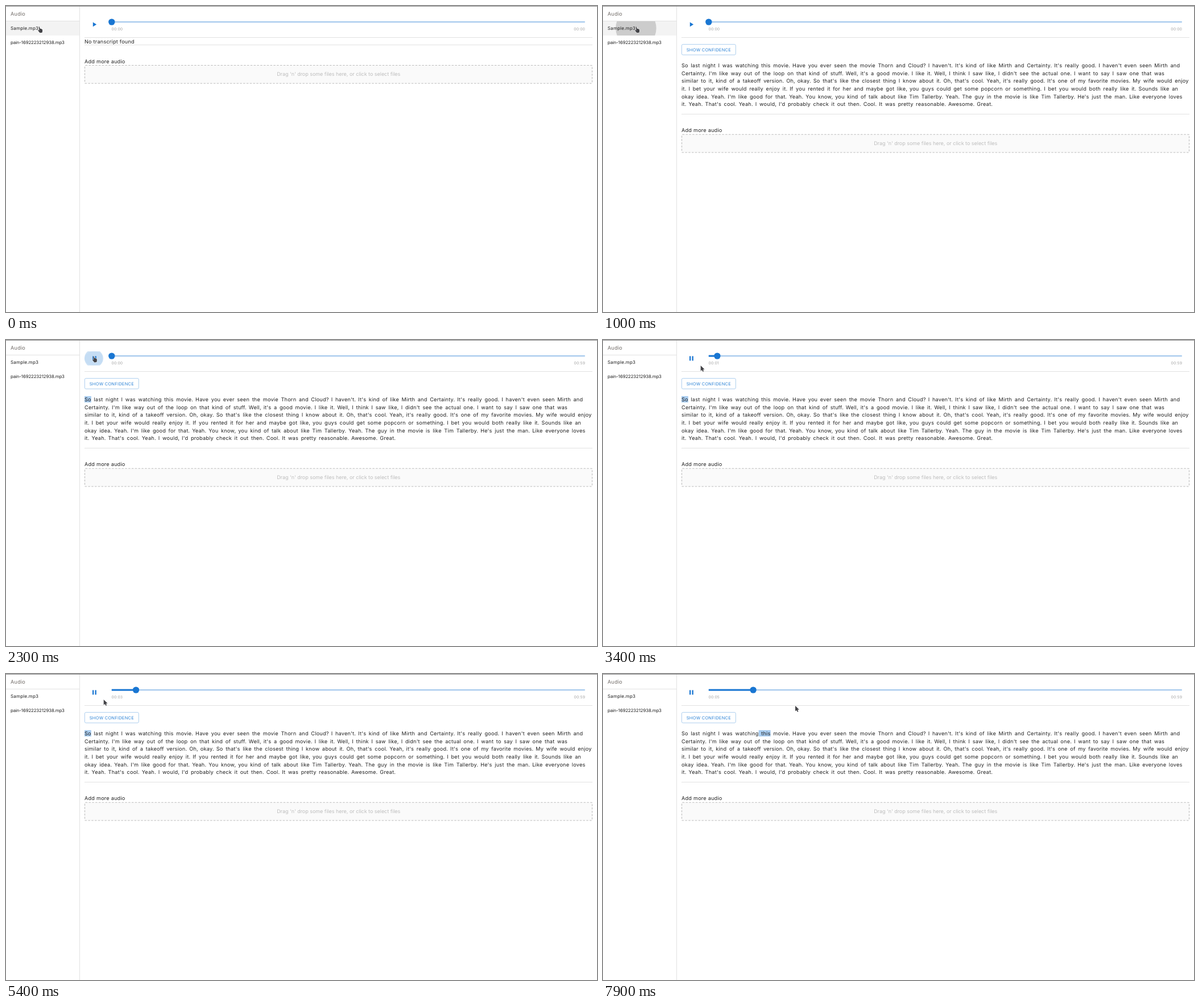
Recreate the animation shown at these times as an HTML page with a canvas. Size 1039 px wide and 539 px high, loop 8000 ms.

```html
<!DOCTYPE html>
<html lang="en">
<head>
<meta charset="utf-8">
<title>Audio transcript player</title>
<style>
  html, body { margin: 0; width: 100%; height: 100%; overflow: hidden; background: #fff; }
  canvas { display: block; width: 1039px; height: 539px; }
</style>
</head>
<body>
<canvas id="stage"></canvas>
<script>
const W = 1039, H = 539, LOOP = 8000, TICK = 100;
const canvas = document.getElementById('stage');
const ctx = canvas.getContext('2d');
const ratio = window.devicePixelRatio || 1;
canvas.width = W * ratio;
canvas.height = H * ratio;

const BLUE = '#1976d2', INK = '#212121', LINE = '#e2e2e2', MUTED = '#bdbdbd';
const BODY = 9.14, WORD_GAP = 4.6;
const MAIN_X = 138, MAIN_W = 893;
const RAIL_X = 185.8, RAIL_W = 832, RAIL_Y = 28.1;

const PRESS_ROW = 810, LOADED = 1000, DURATION_KNOWN = 1200, LEAVE_ROW = 1500;
const PRESS_PLAY = 2110, PLAYING = 2200, AUDIO_START = 2330;
const FIRST_UPDATE = 2840, UPDATE_EVERY = 280, SPEED = 0.0141;
const SPEECH_START = 6700;

const transcript = [
  "So last night I was watching this movie. Have you ever seen the movie Thorn and Cloud? I haven't. It's kind of like Mirth and Certainty. It's really good. I haven't even seen Mirth and",
  "Certainty. I'm like way out of the loop on that kind of stuff. Well, it's a good movie. I like it. Well, I think I saw like, I didn't see the actual one. I want to say I saw one that was",
  "similar to it, kind of a takeoff version. Oh, okay. So that's like the closest thing I know about it. Oh, that's cool. Yeah, it's really good. It's one of my favorite movies. My wife would enjoy",
  "it. I bet your wife would really enjoy it. If you rented it for her and maybe got like, you guys could get some popcorn or something. I bet you would both really like it. Sounds like an",
  "okay idea. Yeah. I'm like good for that. Yeah. You know, you kind of talk about like Tim Tallerby. Yeah. The guy in the movie is like Tim Tallerby. He's just the man. Like everyone loves",
  "it. Yeah. That's cool. Yeah. I would, I'd probably check it out then. Cool. It was pretty reasonable. Awesome. Great."
];

const pointerHome = { x: 57.5, y: 36.3 };
const pointerMoves = [
  { from: 1200, to: 1700, x: 153.3, y: 28.5 },
  { from: 3000, to: 3200, x: 171.7, y: 45 },
  { from: 7300, to: 7900, x: 338, y: 56 }
];
const ARROW_FROM = 3200;

const clamp = v => Math.max(0, Math.min(1, v));
const progress = (t, from, to) => clamp((t - from) / (to - from));

// Standard ripple easing, cubic-bezier(.4, 0, .2, 1)
function ease(p) {
  let lo = 0, hi = 1;
  for (let i = 0; i < 20; i++) {
    const u = (lo + hi) / 2, v = 1 - u;
    if (1.2 * u * v * v + 0.6 * u * u * v + u * u * u < p) lo = u; else hi = u;
  }
  return 3 * lo * lo - 2 * lo * lo * lo;
}

function rect(x, y, w, h, color) {
  ctx.fillStyle = color;
  ctx.fillRect(x, y, w, h);
}

function disc(x, y, r, color) {
  ctx.fillStyle = color;
  ctx.beginPath();
  ctx.arc(x, y, r, 0, Math.PI * 2);
  ctx.fill();
}

function polygon(points, x, y) {
  ctx.beginPath();
  points.forEach(([px, py]) => ctx.lineTo(x + px, y + py));
  ctx.closePath();
}

function setFont(size, tracking) {
  ctx.font = `${size}px Inter, "Open Sans", sans-serif`;
  ctx.textRendering = 'geometricPrecision';
  ctx.letterSpacing = tracking + 'px';
}

function label(text, x, y, size, color, { tracking = size * 0.024, align = 'left' } = {}) {
  setFont(size, tracking);
  ctx.textAlign = align;
  ctx.fillStyle = color;
  ctx.fillText(text, x, y);
}

// Words with their left and right edges; punctuation sits a little tighter
function layout(line) {
  setFont(BODY, BODY * 0.026);
  let x = MAIN_X;
  return line.split(' ').map(text => {
    const left = x, right = left + ctx.measureText(text).width;
    x = right + WORD_GAP - (/\W$/.test(text) ? 0.7 : 0);
    return { text, left, right };
  });
}

function ripple(box, x, y, r, color, alpha) {
  ctx.save();
  ctx.beginPath();
  ctx.rect(...box);
  ctx.clip();
  ctx.globalAlpha = alpha;
  disc(x, y, r, color);
  ctx.restore();
}

function drawSidebar(t) {
  if (t < LEAVE_ROW) rect(0, 27, 129, 25, '#f3f3f3');
  const grow = ease(progress(t, PRESS_ROW, PRESS_ROW + 550));
  const fade = 1 - progress(t, LOADED, LOADED + 550);
  ripple([0, 27, 129, 25], 58, 39, 73 * grow, '#000', 0.16 * fade);
  rect(129, 1, 1, H, LINE);
  rect(0, 26, 129, 1, LINE);
  label('Audio', 8, 16.9, BODY, '#706b67');
  label('Sample.mp3', 8, 42.3, 8, INK);
  label('pain-1692223212938.mp3', 8, 66.5, 7.85, INK, { tracking: -0.12 });
}

function drawPlayButton(t) {
  if (t >= 1700 && t < 2800) {
    ctx.fillStyle = 'rgba(25,118,210,.04)';
    ctx.beginPath();
    ctx.ellipse(155, 32.4, 17, 12.4, 0, 0, Math.PI * 2);
    ctx.fill();
  }
  const grow = ease(progress(t, PRESS_PLAY, PRESS_PLAY + 400));
  const fade = 1 - progress(t, 2300, 2600);
  ripple([138, 20, 34, 24.8], 154.3, 32.4, 22 * grow, BLUE, 0.22 * fade);
  if (t < PLAYING) {
    ctx.fillStyle = BLUE;
    polygon([[0, 0], [6.3, 4], [0, 8]], 152.8, 28.4);
    ctx.fill();
  } else {
    rect(152, 28.4, 2.3, 8, BLUE);
    rect(156.5, 28.4, 2.3, 8, BLUE);
  }
}

// Milliseconds of audio at the player's last position report
function playedAt(t) {
  const n = Math.floor((t - FIRST_UPDATE) / UPDATE_EVERY);
  return n < 0 ? 0 : FIRST_UPDATE + n * UPDATE_EVERY - AUDIO_START;
}

function drawSlider(t) {
  const played = playedAt(t), length = played * SPEED;
  rect(RAIL_X, RAIL_Y - 1.15, RAIL_W, 2.3, '#a7caed');
  if (length) rect(RAIL_X, RAIL_Y - 1.5, length, 3, BLUE);
  disc(RAIL_X + length, RAIL_Y, 5.7, BLUE);
  const clock = s => '00:' + String(s).padStart(2, '0');
  label(clock(Math.floor(played / 1000)), 185.5, 42.6, 6.86, '#a9a9a9', { tracking: 0.1 });
  label(clock(t < DURATION_KNOWN ? 0 : 59), 1018, 42.6, 6.86, '#a9a9a9', { tracking: 0.1, align: 'right' });
  rect(MAIN_X, 55, MAIN_W, 1, LINE);
}

// The first word waits out the opening pause, then speech gathers pace
function spokenIndex(t) {
  return Math.floor(t < SPEECH_START ? 0 : 1 + 5 * progress(t, SPEECH_START, 7700) ** 2.2);
}

function drawHighlight(t) {
  const i = spokenIndex(t), words = layout(transcript[0]);
  const left = i ? words[i - 1].right : MAIN_X;
  rect(left, 98.9, words[i].right - left, 11.1, '#a9cdf0');
}

function drawTranscript(t) {
  ctx.strokeStyle = '#98c2ea';
  ctx.lineWidth = 0.8;
  ctx.beginPath();
  ctx.roundRect(138.4, 67.6, 94.9, 18.5, 2.2);
  ctx.stroke();
  label('SHOW CONFIDENCE', 185.9, 79.9, 7.5, '#2b82d6', { tracking: 0.25, align: 'center' });
  if (t >= PLAYING) drawHighlight(t);
  ctx.textAlign = 'left';
  ctx.fillStyle = INK;
  transcript.forEach((line, i) =>
    layout(line).forEach(word => ctx.fillText(word.text, word.left, 107.8 + i * 13.7)));
  rect(MAIN_X, 190, MAIN_W, 1, LINE);
}

function drawDropzone(y) {
  label('Add more audio', MAIN_X, y - 3.3, BODY, INK);
  ctx.fillStyle = '#fafafa';
  ctx.strokeStyle = MUTED;
  ctx.lineWidth = 1.1;
  ctx.setLineDash([3.5, 2.3]);
  ctx.beginPath();
  ctx.roundRect(138.5, y + 0.5, 892, 31.8, 1.2);
  ctx.fill();
  ctx.stroke();
  ctx.setLineDash([]);
  label("Drag 'n' drop some files here, or click to select files", 584.7, y + 19.3, 8.95, MUTED,
    { tracking: 0, align: 'center' });
}

function pointerAt(t) {
  return pointerMoves.reduce((p, move) => {
    const k = progress(t, move.from, move.to) ** 1.5;
    return { x: p.x + (move.x - p.x) * k, y: p.y + (move.y - p.y) * k };
  }, pointerHome);
}

function drawPointer(t) {
  const { x, y } = pointerAt(t);
  const arrow = [[0, 0], [0, 9.6], [2.2, 7.7], [3.7, 10.8], [5.5, 10], [4, 7], [6.8, 6.8]];
  const hand = [[0, 0.3], [1.1, 0], [2.4, 3.7], [4, 3.6], [6.5, 5.1], [6.6, 8.4],
    [5.8, 10.6], [2, 11], [-1.4, 6.6], [-0.6, 5.8], [1, 6.6]];
  polygon(t < ARROW_FROM ? hand : arrow, x, y);
  ctx.lineJoin = 'round';
  ctx.strokeStyle = 'rgba(255,255,255,.7)';
  ctx.lineWidth = 1.2;
  ctx.stroke();
  ctx.fillStyle = '#434347';
  ctx.fill();
}

function draw(t) {
  ctx.setTransform(ratio, 0, 0, ratio, 0, 0);
  rect(0, 0, W, H, '#fff');
  drawSidebar(t);
  drawPlayButton(t);
  drawSlider(t);
  if (t < LOADED) {
    label('No transcript found', MAIN_X, 65.7, BODY, INK);
    rect(MAIN_X, 68, MAIN_W, 1, LINE);
    drawDropzone(104);
  } else {
    drawTranscript(t);
    drawDropzone(225.7);
  }
  rect(0, 0, W, 1, '#8c8c8c');
  drawPointer(t);
}

const start = performance.now();
function loop() {
  const t = (performance.now() - start) % LOOP;
  draw(Math.floor(t / TICK) * TICK);
  requestAnimationFrame(loop);
}
loop();
</script>
</body>
</html>
```
